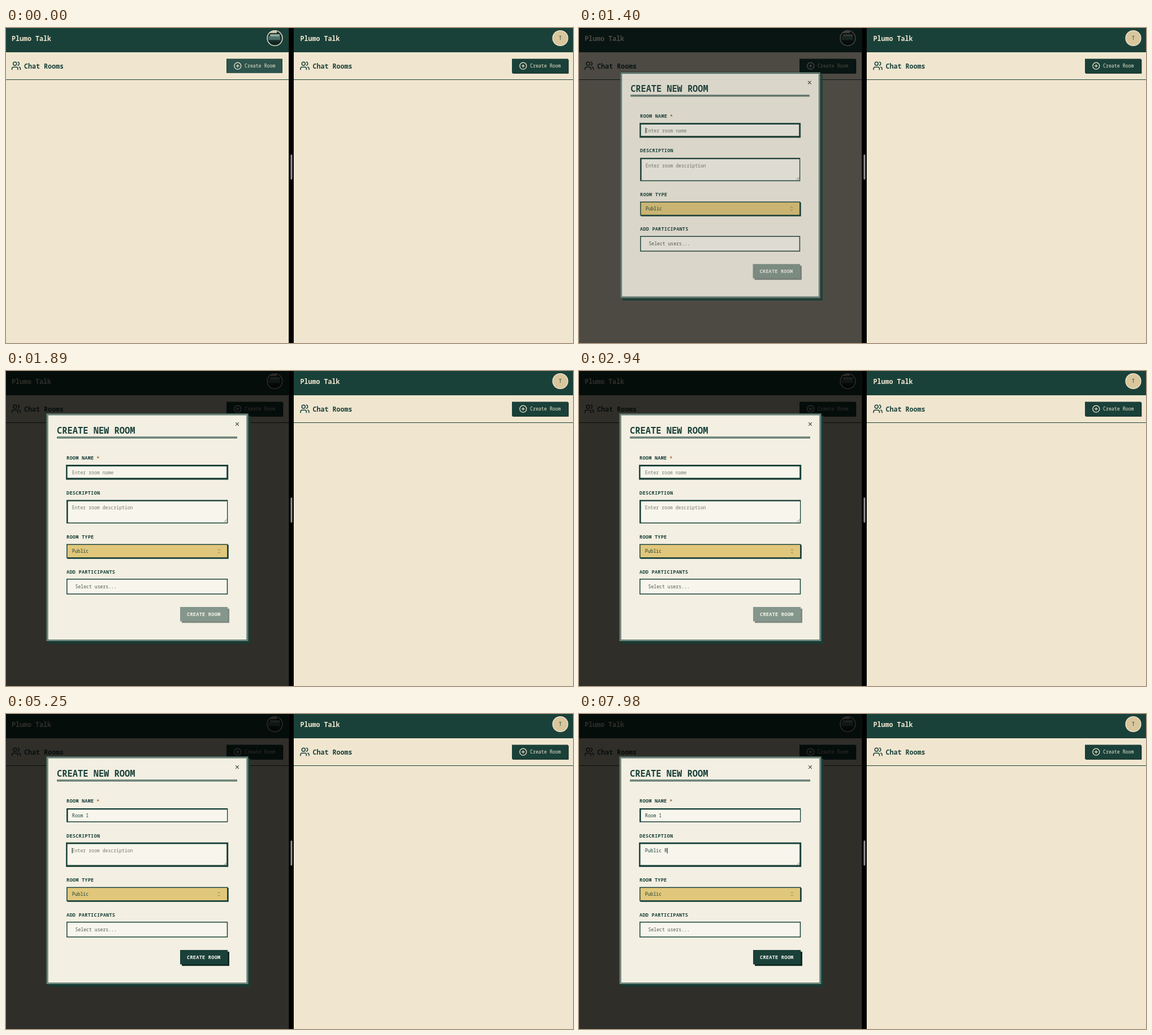
Write an HTML page that moves like this. It is 1003 by 558 pixels and loops after 8 s.

```html
<!DOCTYPE html>
<html lang="en">
<head>
<meta charset="utf-8">
<title>Chat rooms</title>
<style>
  html, body { margin: 0; width: 100%; height: 100%; overflow: hidden; background: #000; }
  svg { display: block; width: 1003px; height: 558px; }
  text { font-family: "Noto Sans Mono", "DejaVu Sans Mono", monospace; white-space: pre; }
  .icon { fill: none; stroke-width: 2; stroke-linecap: round; stroke-linejoin: round; }
</style>
</head>
<body>
<svg id="stage" viewBox="0 0 1003 558"></svg>
<script>
const GREEN = '#1a4139', DARK = '#0d2822', CREAM = '#f0e6d0', PAPER = '#f3efe2', FIELD = '#f8f6ec', HINT = '#74786e';
const LOOP = 8000, TICK = 70, CHAR = 4.9;
const OPEN = 1400, ENABLE = 3400, SWITCH = 5010;

const rect = (x, y, w, h, fill, more = '') =>
  `<rect x="${x}" y="${y}" width="${w}" height="${h}" fill="${fill}" ${more}/>`;
const text = (x, y, size, str, fill = GREEN, more = '') =>
  `<text x="${x}" y="${y}" font-size="${size}" fill="${fill}" ${more}>${str}</text>`;
const bold = 'font-weight="700"';
const label = (y, str) => text(107, y, 8.5, str, GREEN, bold + ' letter-spacing=".29"');
const small = (x, y, str, fill = GREEN, more = '') => text(x, y, CHAR / .6, str, fill, more);
const frame = (x, y, w, h, fill) => rect(x, y, w, h, fill, `stroke="${GREEN}" stroke-width="1.5"`);

const usersIcon = x => `<g class="icon" stroke="${GREEN}" transform="translate(${x} 58) scale(.75)">
  <path d="M16 21v-2a4 4 0 0 0-4-4H6a4 4 0 0 0-4 4v2M22 21v-2a4 4 0 0 0-3-3.87M16 3.13a4 4 0 0 1 0 7.75"/>
  <circle cx="9" cy="7" r="4"/></g>`;
const plusIcon = x => `<g class="icon" stroke="${CREAM}" transform="translate(${x} 60) scale(.6)">
  <circle cx="12" cy="12" r="10"/><path d="M8 12h8M12 8v8"/></g>`;

const createButton = (x, id) => `
  ${rect(x + 1.3, 55.8, 99, 25, DARK, `id="${id}Shadow"`)}
  ${rect(x + .5, 55, 98, 24.2, GREEN, `id="${id}Face" stroke="${GREEN}"`)}
  ${plusIcon(x + 12.6)}
  ${text(x + 32, 70.3, 8.25, 'Create Room', CREAM, 'font-weight="500"')}`;

const pane = (x, width, textX, buttonX, id) => `
  ${rect(x, 0, width, 558, CREAM)}
  ${rect(x, 0, width, 43, GREEN)}
  ${text(textX, 22.5, 11.67, 'Plumo Talk', CREAM, bold)}
  ${usersIcon(textX - 1)}
  ${text(textX + 22, 71.6, 11.67, 'Chat Rooms', GREEN, 'font-weight="600"')}
  ${createButton(buttonX, id)}
  ${rect(x, 91, width, 1, GREEN)}`;

const photo = `<clipPath id="round"><circle cx="475.5" cy="18" r="13.5"/></clipPath>
  <g clip-path="url(#round)">
    ${rect(461, 4, 29, 29, '#1c332f')}
    ${rect(461, 4, 18, 5, '#c9c5a8')}
    ${rect(467, 11, 17, 4, '#8fa79d')}
    ${rect(464, 15, 21, 6, '#4d736b')}
    ${rect(461, 24, 29, 9, '#132522')}
  </g>`;
const ring = x => `<circle cx="${x}" cy="18" r="13.4" fill="none" stroke="${CREAM}" stroke-width="1.4"/>`;

const box = id => `<rect id="${id}Outer" fill="${GREEN}"/><rect id="${id}Inner" fill="${FIELD}"/>`;

const dialog = `<g id="dialog">
  ${rect(75.5, 79.3, 356.7, 403.7, '#163c34')}
  ${rect(71.5, 75.3, 357, 403.7, PAPER)}
  ${rect(72.1, 75.9, 355.8, 402.5, 'none', `stroke="${GREEN}" stroke-width="1.3"`)}
  ${rect(74, 77.8, 352, 398.7, 'none', `stroke="${GREEN}" stroke-width="1"`)}
  <path d="M406.2 91.2l5.6 5.6m0-5.6l-5.6 5.6" stroke="#33463e" stroke-width="1.1"/>
  ${text(90, 111, 15.4, 'CREATE NEW ROOM', GREEN, bold)}
  <path d="M90 116.7h319M90 118.6h319" stroke="${GREEN}" stroke-width="1.1"/>
  ${label(157.2, 'ROOM NAME')}
  ${text(160, 157.6, 9, '*', '#a8632c', bold)}
  ${box('name')}
  ${small(116.8, 182.7, '', GREEN, 'id="nameText"')}
  ${label(218.7, 'DESCRIPTION')}
  ${box('info')}
  <path d="M385.5 267.5l5-5M388.3 267.5l2.3-2.3" stroke="#555" stroke-width=".7"/>
  ${small(116.8, 245.2, '', GREEN, 'id="infoText"')}
  ${label(297.2, 'ROOM TYPE')}
  ${rect(108.5, 308, 285.3, 24.8, GREEN)}
  ${frame(107.8, 307.3, 284, 23.5, '#e0c77b')}
  ${small(116.8, 322, 'Public')}
  <path d="M374.8 317.6l2-2 2 2M374.8 320.6l2 2 2-2" fill="none" stroke="#81784f" stroke-width=".9"/>
  ${label(358.7, 'ADD PARTICIPANTS')}
  ${frame(107.8, 368.7, 283.7, 26.3, FIELD)}
  ${small(122.5, 385, 'Select users...', '#4c584e')}
  <g id="submit">
    ${rect(311, 421, 84, 25.2, DARK)}
    ${rect(308, 418, 84.2, 25.5, GREEN)}
    ${text(320, 434.2, 8.6, 'CREATE ROOM', FIELD, bold + ' letter-spacing=".25"')}
  </g>
  ${rect(0, 0, .9, 10, '#111', 'id="caret"')}
</g>`;

const stage = document.getElementById('stage');
stage.innerHTML = `
  ${pane(0, 500.3, 10, 390, 'left')}
  ${photo}${ring(475.5)}
  ${pane(509, 494, 520.5, 895, 'right')}
  <circle cx="980.5" cy="18" r="13.4" fill="#d9c69c"/>${ring(980.5)}
  ${text(980.5, 20.9, 8, 'T', GREEN, 'text-anchor="middle" font-weight="500"')}
  ${rect(0, 0, 500.3, 558, '#000', 'id="shade"')}
  ${rect(500.3, 0, 8.7, 558, '#000')}
  ${rect(503.5, 224, 3, 44.5, '#929292', 'rx="1.5"')}
  ${dialog}`;

const el = id => document.getElementById(id);
const set = (id, attrs) => { for (const k in attrs) el(id).setAttribute(k, attrs[k]); };
const ease = p => { p = Math.min(1, Math.max(0, p)); return p * p * (3 - 2 * p); };

// Key press times for each field.
const fields = {
  name: { str: 'Room 1', keys: [3430, 3570, 3780, 3990, 4130, 4550], hint: 'Enter room name',
          top: 167, bottom: 191.7, caretY: 174.6 },
  info: { str: 'Public R', keys: [5670, 6020, 6440, 6510, 6580, 7560, 7630, 7980], hint: 'Enter room description',
          top: 228.4, bottom: 270, caretY: 237 }
};
const caretOff = [[1890, 2380], [2940, 3430], [5600, 5670], [7140, 7560]];

function placeRect(id, left, top, right, bottom) {
  set(id, { x: left, y: top, width: right - left, height: bottom - top });
}

function drawField(id, t, focus) {
  const f = fields[id], count = f.keys.filter(k => k <= t).length, grow = .9 * focus;
  placeRect(id + 'Outer', 107 - grow, f.top - grow, 392.3 + grow, f.bottom + grow);
  placeRect(id + 'Inner', 109.6 - focus, f.top + 2.4 - focus * .4, 391 - focus * .8, f.bottom - 1.5 - focus);
  el(id + 'Text').textContent = count ? f.str.slice(0, count) : f.hint;
  set(id + 'Text', { fill: count ? GREEN : HINT });
  return count;
}

function draw(time) {
  const t = Math.floor(time / TICK) * TICK;
  const open = t >= OPEN, step = (t - OPEN) / TICK;
  const shown = !open ? 0 : step < 2 ? 1 - .15 * .1 ** step : 1;

  set('leftFace', { fill: open ? GREEN : '#2d544d' });
  set('leftShadow', { opacity: open ? 1 : 0 });
  set('shade', { opacity: .8 * shown });
  set('dialog', {
    opacity: shown,
    transform: `translate(250 ${277.2 + 8 * (1 - shown)}) scale(${.95 + .05 * shown}) translate(-250 -277.2)`
  });

  const moved = ease((t - SWITCH) / 200);
  const counts = { name: drawField('name', t, 1 - moved), info: drawField('info', t, moved) };
  set('submit', { opacity: .5 + .5 * ease((t - ENABLE) / 200) });

  const active = t < SWITCH ? 'name' : 'info';
  const hidden = caretOff.some(([a, b]) => t >= a && t < b);
  set('caret', { x: 116.6 + CHAR * counts[active], y: fields[active].caretY, opacity: hidden ? 0 : 1 });
}

const start = performance.now();
function loop() {
  draw((performance.now() - start) % LOOP);
  requestAnimationFrame(loop);
}
loop();
</script>
</body>
</html>
```
